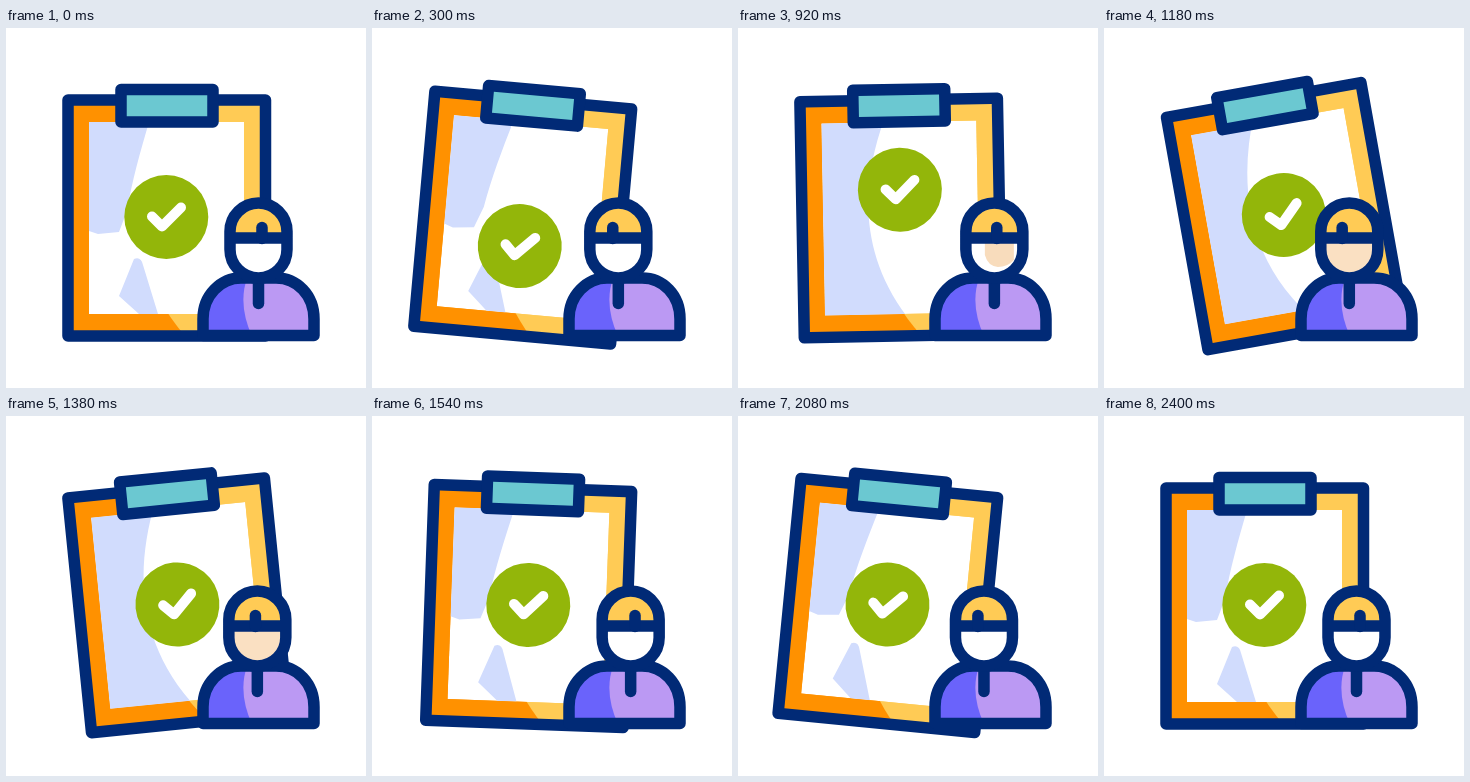
Write an HTML page that moves like this. It is 360x360 px and loops after 2.42 s.

```html
<!DOCTYPE html>
<html lang="en">
<head>
<meta charset="utf-8">
<title>Clipboard check</title>
<style>
  html, body { margin: 0; height: 100%; overflow: hidden; background: #fff; }
  svg { display: block; width: 100vw; height: 100vh; }
  .line { stroke: #012a76; stroke-width: 11.5; stroke-linecap: round; stroke-linejoin: round; fill: none; }
</style>
</head>
<body>
<svg viewBox="0 0 360 360">
  <defs>
    <clipPath id="paper"><path d="M83 94H238V286H83Z"/></clipPath>
    <clipPath id="frame"><path d="M62 72H260V308H62Z"/></clipPath>
    <clipPath id="headShape"><path d="M224 203.5a28.5 28.5 0 0 1 57 0v18a28.5 28.5 0 0 1-57 0z"/></clipPath>
    <clipPath id="bodyShape"><path d="M197 307.5V291C197 267 215 250 235 250H270C291 250 308 267 308 291V307.5Z"/></clipPath>
    <g id="badge">
      <circle cx="160.3" cy="189" r="42" fill="#93b60a"/>
      <path d="M146 188.5L156 198.5L175 179.5" fill="none" stroke="#fff" stroke-width="10"
        stroke-linecap="round" stroke-linejoin="round"/>
    </g>
  </defs>

  <g id="board">
    <g clip-path="url(#frame)">
      <path d="M62 72H260V308H62Z" fill="#ff9100"/>
      <path d="M148 66C122 150 113 230 179 308H260V66Z" fill="#ffcb55"/>
    </g>
    <g clip-path="url(#paper)">
      <path d="M83 94H238V286H83Z" fill="#fff"/>
      <path id="fullShade" d="M83 86H148C122 150 113 230 178 305H83Z" fill="#d1dcfd"/>
      <path id="brokenShade" fill="#d1dcfd"
        d="M83 94H143C134 125 126 153 121 183L113 204L92 206L83 203Z M128 231Q135 228 137 237L152 286H133L113 268Z"/>
      <use id="leaving" href="#badge"/>
      <use id="arriving" href="#badge"/>
    </g>
    <path class="line" d="M62 72H259.5V308H62Z"/>
    <path class="line" d="M115 61.5H207V94H115Z" style="fill:#6bc8d1"/>
  </g>

  <g clip-path="url(#bodyShape)">
    <path d="M190 245H315V310H190Z" fill="#6a63fb"/>
    <path d="M243 245Q230 275 247 310H315V245Z" fill="#bb99f3"/>
  </g>
  <path class="line" d="M197 307.5V291C197 267 215 250 235 250H270C291 250 308 267 308 291V307.5Z"/>

  <g id="head">
    <path class="line" d="M252.5 254V275.5"/>
    <g clip-path="url(#headShape)">
      <path d="M220 170H285V255H220Z" fill="#fff"/>
      <path id="fullFace" d="M220 210H285V255H220Z" fill="#fae0c2"/>
      <path id="partFace" d="M243 214H272V232Q266 239 256 239Q246 238 243 227Z" fill="#f8dcbc"/>
      <path d="M220 170H285V210H220Z" fill="#ffcb55"/>
    </g>
    <path class="line" d="M224 203.5a28.5 28.5 0 0 1 57 0v18a28.5 28.5 0 0 1-57 0zM224 210H281"/>
  </g>
  <path id="fringe" class="line" d="M256 199.5V210.5"/>
</svg>

<script>
const LOOP = 2420;
const $ = id => document.getElementById(id);

// Eased value through evenly spaced keys, holding the last one.
function along(keys, step, time) {
  const pos = Math.min(time / step, keys.length - 1);
  const i = Math.min(Math.floor(pos), keys.length - 2);
  const u = pos - i;
  return keys[i] + (keys[i + 1] - keys[i]) * u * u * (3 - 2 * u);
}

const move = (id, x, y) => $(id).setAttribute('transform', `translate(${x} ${y})`);
const show = (id, on) => $(id).style.display = on ? '' : 'none';

function draw(now) {
  const t = now % LOOP;
  const angle = along([0, 10.2, -10.2, 10.2, 0], 600, t);
  $('board').setAttribute('transform', `rotate(${angle} 160 78)`);

  const scroll = along([0, 35, -228, -193], 400, t);
  move('leaving', 0, scroll);
  move('arriving', 0, scroll + 193);

  move('head', along([0, -7.3, 7, -7.3, 7, -7.3, 0], 400, t), 0);
  move('fringe', along([0, -18, 8.6, -18, 8.6, -18, 0], 400, t), 0);

  const shaded = t > 400 && t < 1400;
  show('fullShade', shaded);
  show('brokenShade', !shaded);
  show('fullFace', t > 1000 && t < 1400);
  show('partFace', t > 400 && t <= 1000);
  requestAnimationFrame(draw);
}

requestAnimationFrame(draw);
</script>
</body>
</html>
```
